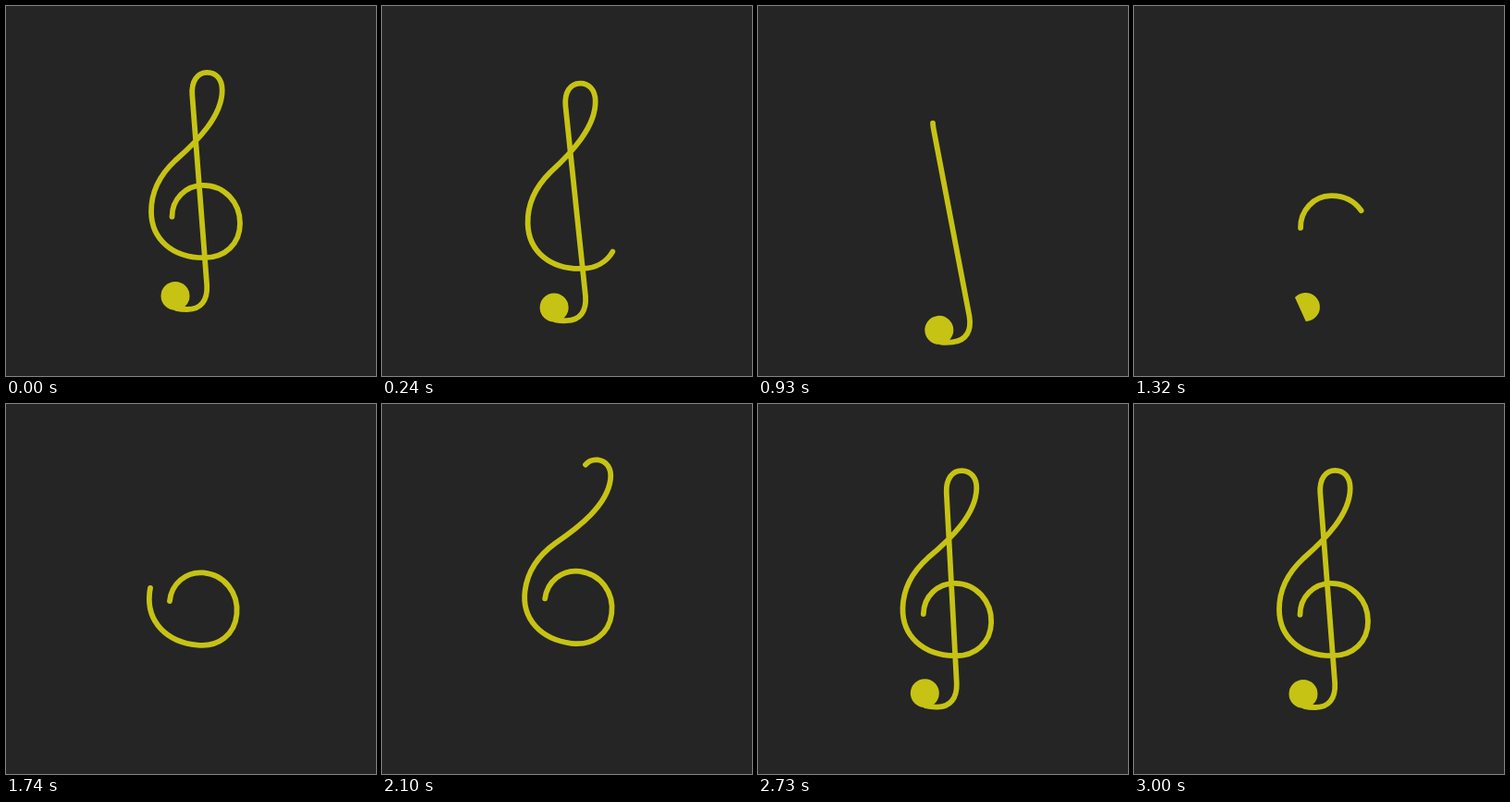
These frames come from a looping animation (400 px wide and 400 px high, 5030 ms). An HTML page with a canvas:

```html
<!DOCTYPE html>
<html lang="en">
<head>
<meta charset="utf-8">
<title>Treble clef</title>
<style>
  html, body { margin: 0; height: 100%; overflow: hidden; background: #252525; }
  canvas { display: block; }
</style>
</head>
<body>
<canvas id="stage" width="400" height="400"></canvas>
<script>
const ctx = document.getElementById('stage').getContext('2d');
const COLOR = '#c6c315';
const LOOP = 5030, MOVING = 3000, STEP = 30;

// One line from the inner end of the spiral to the hook under the ball.
const line = new Path2D(`M179.5 227.8
  C179.5 209 194 193.8 213 193.8 C236 193.8 253 212 253 235
  C253 257 237 272.2 214 272.2 C180 272.2 157 252 157 222
  C157 200 168 181 183 167 C207 146 233.7 119 233.7 91
  C233.7 79 227 71.9 217.5 71.9 C207 71.9 200.3 81 201.3 96
  L217.2 302 C218 318 211 328 196 328 C190 328 185 327.5 180 325.5`);
const LINE = 737;
const ball = { x: 183, y: 313.4, r: 15.5 };
const TOTAL = LINE + 2 * Math.PI * ball.r;

// Keys are [time in ms, value].
const lift = [[0, 0], [675, 42], [1930, -16.2], [2800, 0]];
const tilt = [[0, 0], [780, -7], [2020, 7.3], [3000, 0]];
const erased = [[0, 0], [450, 258], [540, 318], [930, 474.5], [1400, TOTAL]];
const drawn = [[1100, 0], [1620, 215], [1740, 269], [2100, 462], [2520, 785], [2620, TOTAL]];

const linear = p => p;
const smooth = p => p * p * (3 - 2 * p);

function valueAt(keys, t, ease) {
  if (t <= keys[0][0]) return keys[0][1];
  const i = keys.findIndex(key => key[0] > t);
  if (i < 0) return keys[keys.length - 1][1];
  const [t0, v0] = keys[i - 1], [t1, v1] = keys[i];
  return v0 + (v1 - v0) * ease((t - t0) / (t1 - t0));
}

// Draws the clef between two distances along the line and the ball's outline.
function drawPart(from, to) {
  const end = Math.min(to, LINE);
  if (end > from) {
    ctx.setLineDash([end - from, 2 * TOTAL]);
    ctx.lineDashOffset = -from;
    ctx.stroke(line);
  }
  const angle = d => Math.PI / 2 + Math.max(d - LINE, 0) / ball.r;
  if (to > LINE && to > from) {
    ctx.beginPath();
    ctx.arc(ball.x, ball.y, ball.r, angle(from), angle(to));
    ctx.fill();
  }
}

function render(now) {
  const t = Math.min(Math.floor(now % LOOP / STEP) * STEP, MOVING);
  ctx.setTransform(1, 0, 0, 1, 0, 0);
  ctx.fillStyle = '#252525';
  ctx.fillRect(0, 0, 400, 400);

  ctx.translate(200, 200 + valueAt(lift, t, smooth));
  ctx.rotate(valueAt(tilt, t, smooth) * Math.PI / 180);
  ctx.translate(-200, -200);
  ctx.fillStyle = ctx.strokeStyle = COLOR;
  ctx.lineWidth = 5.8;
  ctx.lineCap = ctx.lineJoin = 'round';
  drawPart(valueAt(erased, t, linear), TOTAL);
  drawPart(0, valueAt(drawn, t, linear));
}

const start = performance.now();
function tick() {
  render(performance.now() - start);
  requestAnimationFrame(tick);
}
tick();
</script>
</body>
</html>
```
